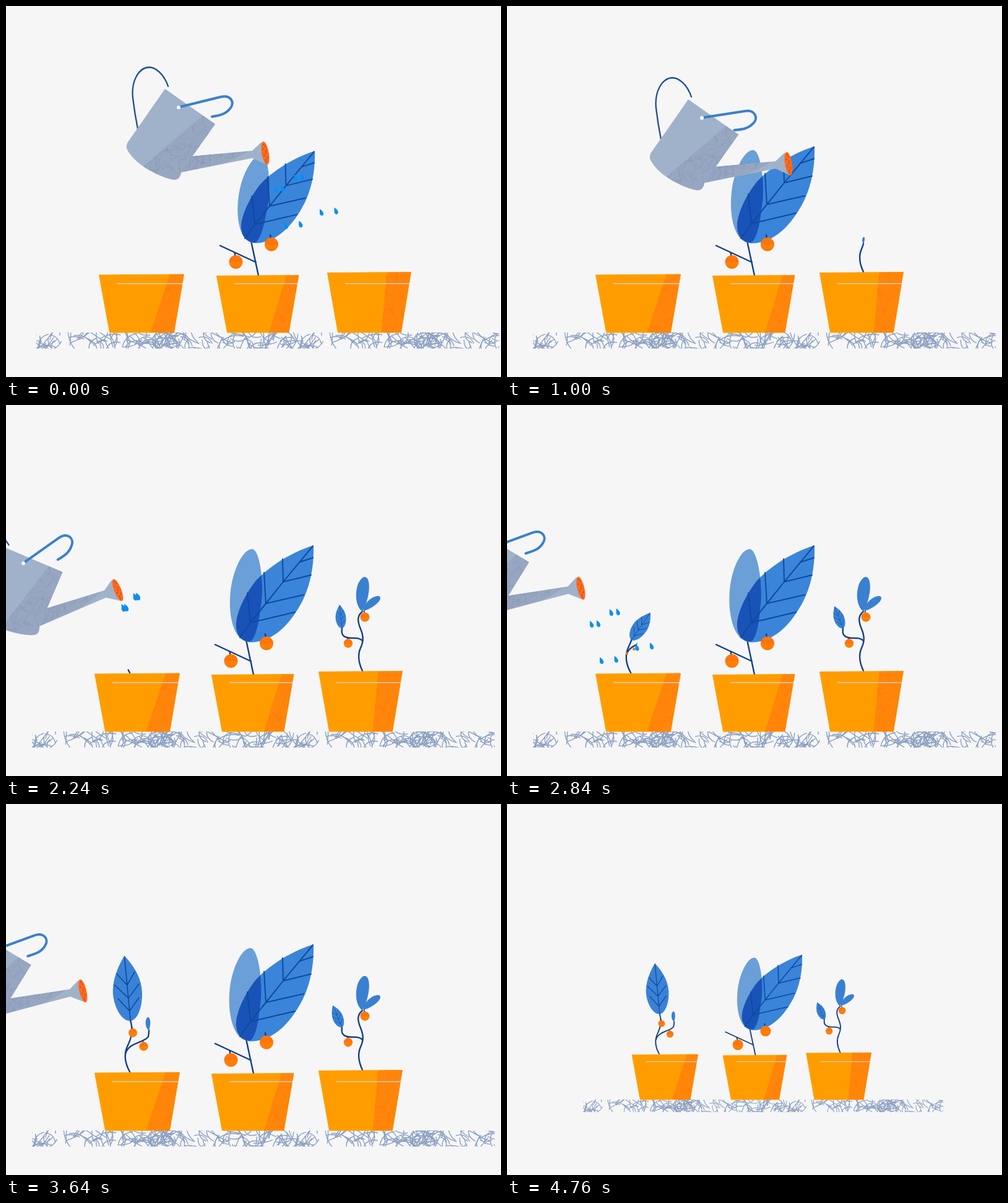
These frames come from a looping animation (800x600 px, 4800 ms). An HTML page:

```html
<!DOCTYPE html>
<html lang="en">
<head>
<meta charset="utf-8">
<title>Watering the pots</title>
<style>
html, body { margin: 0; width: 100%; height: 100%; overflow: hidden; background: #f6f6f6; }
svg { display: block; width: 800px; height: 600px; }
.line { fill: none; stroke: #123f86; stroke-width: 2.4; stroke-linecap: round; stroke-linejoin: round; }
.vein { fill: none; stroke: #0d4a9f; stroke-width: 2; stroke-linecap: round; }
.fine { stroke-width: 1.6; }
.blend { isolation: isolate; }
.front { mix-blend-mode: multiply; }
</style>
</head>
<body>
<svg id="stage" viewBox="0 0 800 600"></svg>
<script>
const LOOP = 4800, STEP = 40;
const stage = document.getElementById('stage');

// Progress helpers: all map the time span a..b to 0..1.
const unit = (t, a, b) => Math.min(1, Math.max(0, (t - a) / (b - a)));
const ease = (t, a, b) => { const u = unit(t, a, b); return u * u * (3 - 2 * u); };
const out = (t, a, b) => 1 - (1 - unit(t, a, b)) ** 2;
const hump = (t, a, b) => Math.sin(Math.PI * unit(t, a, b)) ** 2;
const mix = (a, b, u) => a + (b - a) * u;

let seed = 11;
const rnd = () => (seed = (seed * 16807) % 2147483647) / 2147483647;

// Random curved strokes inside a box.
function scribble(n, x, y, w, h, len) {
  let d = '';
  for (let i = 0; i < n; i++) {
    const a = 6.283 * rnd(), l = mix(0.6, 1.3, rnd()) * len, bend = mix(-0.6, 0.6, rnd()) * l;
    const dx = Math.cos(a) * l, dy = Math.sin(a) * l;
    const cx = dx / 2 - Math.sin(a) * bend, cy = dy / 2 + Math.cos(a) * bend;
    d += `M${x + w * rnd() - dx / 2} ${y + h * rnd() - dy / 2}q${cx} ${cy} ${dx} ${dy}`;
  }
  return d;
}

const SHADE = 'M39 13L59 27Q30 68 4 105Q2 118 -8 117C-25 114 -42 105 -57 95Z';
const SPOUT = 'M22 79L112 71Q96 82 75 90L4 105Z';

function pot(id, x1, x2, y, shadeTop, shadeFoot) {
  const shade = `M${x2 - shadeTop} ${y}L${x2} ${y - 0.5}L${x2 - 16} 528H${x2 - shadeFoot}Z`;
  return `<g id="${id}">
    <path d="M${x1} ${y + 0.5}L${x2} ${y - 0.5}L${x2 - 16} 528H${x1 + 17}Z" fill="#ff9d00" stroke="#ff9d00" stroke-linejoin="round"/>
    <path d="${shade}" fill="#ff860a"/>
    <clipPath id="${id}c"><path d="${shade}"/></clipPath>
    <path clip-path="url(#${id}c)" d="${scribble(45, x2 - shadeFoot, y, shadeFoot, 92, 16)}" fill="none" stroke="#fb700f" stroke-opacity=".4"/>
    <path d="M${x1 + 28.5} 449H${x2 - 2}" stroke="#dccfc0" stroke-width="1.5"/>
  </g>`;
}

const berry = id => `<g id="${id}"><path class="line" d="M-1 -9L-2 -15"/><circle r="11" fill="url(#berry)"/></g>`;
const petal = id => `<path id="${id}" d="M0 0C-12 -8 -14 -30 -9 -45C-5 -54 -1 -57 2 -56C11 -54 12 -25 0 0Z" fill="#3a80d0"/>`;
const leaf = id => `<g id="${id}">
  <path d="M0 0C-14 0 -25 -25 -24 -48C-23 -70 -10 -92 0 -106C12 -90 24 -70 23 -45C22 -22 12 0 0 0Z" fill="#3a82d6"/>
  <path class="vein fine" d="M0 0V-104M-17 -38L0 -16L17 -36M-20 -60L0 -37L19 -58M-15 -78L0 -58L14 -78"/></g>`;
const stem = (id, d) => `<path id="${id}" class="line" d="${d}"/>`;

let holes = '';
for (let i = 0; i < 9; i++) holes += `<circle cx="${2.5 * Math.sin(i * 2.3)}" cy="${3.6 * i - 14.4}" r="1"/>`;

stage.innerHTML = `
<defs>
  <linearGradient id="berry" x2="0" y2="1">
    <stop offset="0" stop-color="#ff7c04"/><stop offset=".4" stop-color="#ff7010"/>
    <stop offset=".6" stop-color="#ff8400"/><stop offset="1" stop-color="#ff7404"/>
  </linearGradient>
  <clipPath id="band"><rect x="42" y="528" width="748" height="26"/></clipPath>
  <clipPath id="dark"><path d="${SHADE}"/><path d="${SPOUT}"/></clipPath>
  <path id="tile" d="${scribble(150, 42, 526, 423, 30, 28)}${scribble(30, 234, 528, 34, 26, 20)}"/>
</defs>
<rect width="800" height="600" fill="#f6f6f6"/>
<g id="world">
  <g id="ground"><g clip-path="url(#band)" fill="none" stroke="#8ba0c2" stroke-width="1.4">
    <use href="#tile"/><use href="#tile" x="423"/><use href="#tile" x="-423"/></g></g>
  ${stem('stemA', 'M200 433C191 417 191 402 197 390C203 378 206 366 201 350')}
  ${stem('twigA', 'M193 404C198 385 225 386 230 376Q231 371 231 366')}
  ${petal('budA')}${leaf('leafA')}${berry('berryA1')}${berry('berryA2')}
  ${pot('potA', 143.5, 280.5, 434.5, 23, 54)}
  <g id="middle">
    <path class="line" d="M400 436L388 380M338 387.5L396 414.5"/>
    <g class="blend">
      <path id="pale" d="M398 233C412 234 418 300 411 330C408 362 400 384 392 383C370 382 358 345 363 300C367 265 384 232 398 233Z" fill="#6b9fd8"/>
      <path id="big" class="front" d="M497 227C468 236 430 256 404 284C385 308 370 340 372 360C374 380 390 386 405 383C440 378 465 345 480 315C492 290 498 260 497 227Z" fill="#3a85d9"/>
      <path id="veins" class="vein" d="M378 376L395 352L420 321L448 286L496 228M390 304L395 352L467 335M417 271L420 321L481 307M447 249L448 286L493 275M475 254L496 247"/>
    </g>
    <g transform="translate(363.5 414)">${berry('berryB1')}</g>
    <g transform="translate(421 385.5)">${berry('berryB2')}</g>
    ${pot('potB', 332.5, 465, 436, 20, 48)}
  </g>
  <g id="right">
    ${stem('stemC', 'M576 430C569 415 568 404 573 393C578 382 578 374 573 362C568 350 567 341 576 334')}
    ${stem('twigC', 'M576 381C568 374 560 379 551 376C543 374 542 369 543 361')}
    ${petal('petalC1')}${petal('petalC2')}${leaf('leafC')}${berry('berryC1')}${berry('berryC2')}
    ${pot('potC', 505.5, 640.5, 431, 39, 48)}
  </g>
  <g id="drops" fill="#0a8ff0"></g>
  <g id="can">
    <path d="M-17 -34C-24 -55 -38 -65 -48 -65C-65 -64 -77 -42 -74 -15Q-71 10 -66 35" fill="none" stroke="#1d4f94" stroke-width="2.3" stroke-linecap="round"/>
    <path d="M22 79L119 70L134 56L143 93L119 82L4 105Z" fill="#a0b2c9"/>
    <path d="M-22 -30L59 27Q30 68 4 105Q2 118 -8 117C-40 110 -75 88 -84 66Q-85 60 -82 56Z" fill="#a0b2c9"/>
    <path d="${SHADE}${SPOUT}" fill="#97a7c1"/>
    <path clip-path="url(#dark)" d="${scribble(130, -57, 13, 116, 104, 22)}${scribble(25, 10, 72, 95, 30, 16)}" fill="none" stroke="#8394b3" stroke-opacity=".5"/>
    <g transform="translate(140 74) rotate(-10)"><ellipse rx="5.8" ry="19" fill="#ff6a1e"/><g fill="#b8430f">${holes}</g></g>
    <path id="handle" d="M3 -1L68 -17C84 -21 92 -8 83 2C76 11 66 13 54 15" fill="none" stroke="#3b80cc" stroke-width="4" stroke-linecap="round"/>
    <circle r="3" fill="#fff"/>
  </g>
</g>`;

const el = {};
stage.querySelectorAll('[id]').forEach(n => el[n.id] = n);
const place = (id, v) => el[id].setAttribute('transform', v);
const slideX = (id, x) => place(id, `translate(${x} 0)`);
const pose = (id, x, y, turn, size) => place(id, `translate(${x} ${y}) rotate(${turn}) scale(${size})`);
const hinge = (id, x, y, turn, size) =>
  place(id, `translate(${x} ${y}) rotate(${turn}) scale(${size}) translate(${-x} ${-y})`);

// Draws the first part of a stem and returns its tip.
function grow(id, f) {
  const p = el[id], len = p.getTotalLength();
  p.style.strokeDasharray = `${len * f} ${len * 2}`;
  p.style.visibility = f > 0 ? 'visible' : 'hidden';
  return p.getPointAtLength(len * f);
}

function ripen(id, p, x1, y1, x2, y2, r) {
  pose(id, mix(x1, x2, p), mix(y1, y2, p), 0, r / 11 * p ** 0.4);
}

function drawLeft(t) {
  const twig = out(t, 2600, 3640), open = out(t, 2500, 3640), ripe = ease(t, 2700, 3600);
  const top = grow('stemA', out(t, 2190, 3790)), end = grow('twigA', twig);
  pose('leafA', top.x, top.y, mix(76, -5.4, open), open);
  pose('budA', end.x, end.y, mix(45, -5, twig), 0.38 * twig * twig);
  ripen('berryA1', ripe, 193, 404, 205, 370, 7);
  ripen('berryA2', ripe, 204, 395, 222.5, 392, 7.2);
}

function drawRight(t) {
  const open = out(t, 860, 2240), ripe = ease(t, 1300, 2240);
  const top = grow('stemC', out(t, 760, 1640)), end = grow('twigC', out(t, 1300, 2240));
  const sway = Math.sin(Math.PI * (1 - unit(t, 1020, 2240)));
  pose('petalC1', top.x, top.y, 3 - 20 * sway, open);
  pose('petalC2', top.x + 2, top.y - 1, mix(30, 48, ease(t, 1400, 2240)), 0.62 * ease(t, 1100, 1700));
  pose('leafC', end.x, end.y, mix(-85, -6, ease(t, 1640, 2240)) - 17 * ease(t, 2240, 3000), 0.36 * out(t, 1540, 2240));
  ripen('berryC1', ripe, 572, 344.5, 580, 343, 7.5);
  ripen('berryC2', ripe, 575, 383.5, 553, 385.5, 7.2);
}

// Two showers of two waves; four drops in a wave fan out from the rose at (x, y).
function drawDrops(t, x, y) {
  let drops = '';
  for (const start of [-740, 2100]) for (const delay of [0, 400]) {
    const age = t - start - delay, s = age / 1000;
    if (age <= 60 || age >= 880) continue;
    const size = Math.max(1, 1.2 - s / 1.7);
    for (let i = 0; i < 4; i++) {
      const pair = i >> 1;
      const px = x + 4 + 10 * pair + (40 + 32 * i) * s, py = y + 9 - 17 * pair + (147 - 3 * i) * s;
      drops += `<path transform="translate(${px} ${py}) scale(${size})" d="M-3 -6C1 -4 4 0 3 3C2 6 -3 5 -3 1Z"/>`;
    }
  }
  el.drops.innerHTML = drops;
}

function drawCan(t) {
  const settle = ease(t, 2900, 3600), leave = unit(t, 3900, 4760) ** 3;
  const x = 279 + 36 * out(t, 0, 800) - 340 * ease(t, 1289, 2557) + 5 * settle - 280 * leave;
  const y = 164 + 17 * ease(t, 300, 1000) + 75 * ease(t, 1100, 2100) - 25 * ease(t, 2300, 2840) + 6 * settle + 40 * leave;
  const tilt = -13 * ease(t, 1100, 1640) + 9.5 * ease(t, 2100, 2800);
  const swing = 0.8 * tilt + 5 * (ease(t, 0, 500) - ease(t, 1100, 1640));
  place('can', `translate(${x} ${y}) rotate(${tilt})`);
  place('handle', `rotate(${swing})`);
  const a = tilt * Math.PI / 180, c = Math.cos(a), s = Math.sin(a);
  drawDrops(t, x + 140 * c - 74 * s, y + 140 * s + 74 * c);
}

function draw(t) {
  hinge('world', 407, 303, 0, 1 - 0.222 * unit(t, 4304, 4760) ** 1.8);

  const slide = 1 - out(t, 0, 640), size = 1 - 0.05 * slide;
  slideX('ground', 7 * slide);
  slideX('potA', 7 * slide);
  slideX('middle', 8 * slide);
  slideX('right', 14 * slide);

  const push = 2.6 * hump(t, 1200, 2080);
  hinge('pale', 392, 383, 3 * slide - 2.9 * hump(t, 2240, 4000), size);
  hinge('big', 378, 377, push, size);
  hinge('veins', 378, 377, push, size);

  drawLeft(t);
  drawRight(t);
  drawCan(t);
}

const begin = performance.now();
function tick() {
  const t = (performance.now() - begin) % LOOP;
  draw(Math.floor(t / STEP) * STEP);
  requestAnimationFrame(tick);
}
tick();
</script>
</body>
</html>
```
